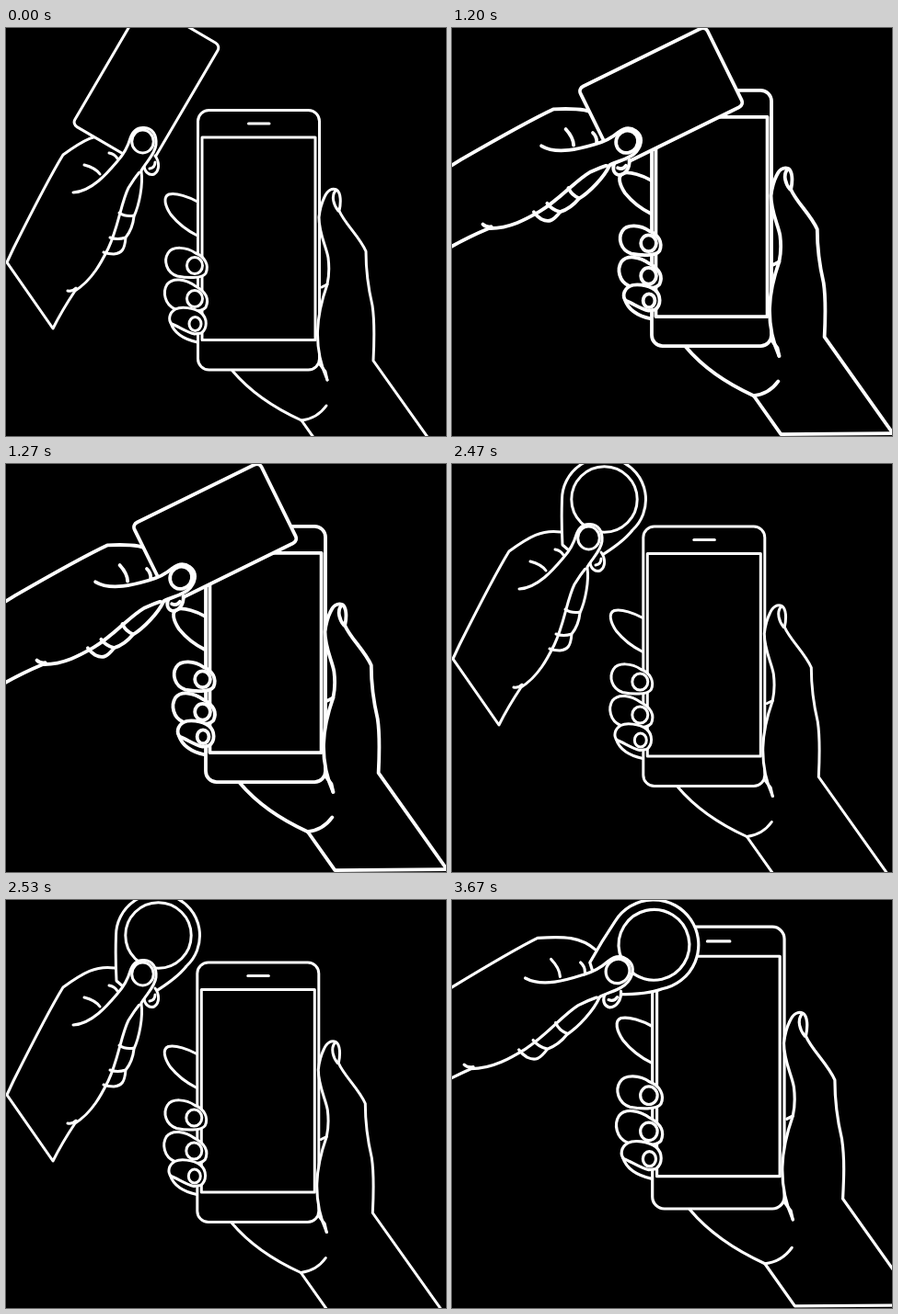
An HTML page for the animation above (4.79 s loop, 478 by 444 pixels).

```html
<!DOCTYPE html>
<html lang="en">
<head>
<meta charset="utf-8">
<title>Tap to phone</title>
<style>
  html, body { margin: 0; width: 100%; height: 100%; overflow: hidden; background: #000; }
  svg { display: block; width: 478px; height: 444px; }
  path, rect, ellipse, circle {
    fill: #000; stroke: #fff;
    stroke-linecap: round; stroke-linejoin: round;
    vector-effect: non-scaling-stroke;
  }
  .line { fill: none; }
</style>
</head>
<body>
<svg id="stage" viewBox="0 0 478 444">
  <g id="phone">
    <!-- palm, wrist and index finger behind the phone -->
    <path class="line" d="M246 373C262 392 288 412 321 427L351 469.5L474.5 468.5"/>
    <path class="line" d="M321 427Q338 425 348 411"/>
    <path d="M208 189C199 184 185 179 177 181C170 184 173 194 179 203C187 213 198 221 208 226"/>
    <path class="line" d="M179 321C183 333 194 339 208 342"/>
    <rect x="208.5" y="89.5" width="132" height="282.5" rx="12"/>
    <rect x="213" y="119" width="123" height="220.5"/>
    <path class="line" d="M263.5 104H286"/>
    <!-- fingers over the edge -->
    <path d="M186 270C174 266 171 253 176 245C181 237 196 238 206 245C216 249 221 258 217 267C213 273 196 272 186 270Z"/>
    <ellipse cx="205" cy="258.500" rx="8.500" ry="9"/>
    <path d="M184 306C172 301 170 287 175 279C181 271 195 273 206 281C217 287 221 295 217 304C212 310 196 309 184 306Z"/>
    <ellipse cx="205" cy="294.500" rx="8.500" ry="9"/>
    <path d="M212 332C219 327 219 316 212 310C204 304 190 303 184 306C177 310 176 318 180 322C188 325 196 331 205 333Z"/>
    <ellipse cx="205.500" cy="322" rx="6.500" ry="7.500"/>
    <!-- thumb -->
    <path d="M349 383C341 365 338 350 338.500 330C339 312 343 296 349 279C351 270 351 258 350 250C348 238 340 224 340 206C341 197 343 190 346 184C349 177 354 174 359 176C364 179 364 190 362 199C368 213 384 227 391 243C391 268 394 285 398 302C401 322 400 342 399 362L474.500 468.500"/>
    <path class="line" d="M358 177C353 183 356 193 361 199M343 282L349 279M341 366L347 374L349 383"/>
  </g>
  <g id="hand">
    <path d="M118 117C98 114 84 122 62 138C46 164 26 204 8 240L1 255L51 327C59 311 67 298 75 286C94 274 104 254 111 240C122 217 125 190 133 174Q139 164 147 154"/>
    <path class="line" d="M67 286Q72 287 76 283"/>
    <path class="line" d="M147 156C149 170 145 192 139 205C138 215 134 223 130 228C129 241 126 245 117 246Q111 246 106 244M123 201Q130 206 139 204M113 228Q121 231 130 228"/>
    <path class="line" d="M112 136Q118 137 121 142"/>
    <rect id="card" width="155" height="96" rx="6" transform="translate(71.9 104.6) rotate(-59.7)"/>
    <g id="fob">
      <path d="M127 137L120 131C119 112 119 96 119.500 81.500A45.500 45.500 0 1 1 196 115Q186 128 160 144"/>
      <circle cx="165.500" cy="81.500" r="35.700"/>
    </g>
    <path d="M162 139C167 146 167 155 161 159C155 161 150 156 150 149"/>
    <path class="line" d="M156 153Q162 152 162 146"/>
    <path d="M73 179C93 178 110 158 121 145C130 135 133 127 135 120C138 111 143 108 150 108.500C159 109 164 116 163 127C162 137 153 145 147 155"/>
    <ellipse cx="148.500" cy="123.500" rx="11.800" ry="12.500"/>
    <path class="line" d="M85 149Q97 152 102 159"/>
  </g>
</svg>
<script>
  const LOOP = 4790, HOLD = 1200;
  const el = id => document.getElementById(id);
  const stage = el('stage'), phone = el('phone'), hand = el('hand');
  const card = el('card'), fob = el('fob');

  // phone: corner x, y, scale; hand: thumbnail x, y, scale, turn
  const poses = [
    { phone: [208.5, 89.5, 1], hand: [149, 123.5, 1, 0], tool: card, line: 3 },
    { phone: [217, 67.8, 0.985], hand: [190.5, 124, 0.993, 33.5], tool: card, line: 3.8 },
    { phone: [207.8, 68, 1], hand: [149, 80.5, 1, 0], tool: fob, line: 3 },
    { phone: [217.7, 29.2, 1.086], hand: [180.5, 77.7, 1.075, 32], tool: fob, line: 3.2 }
  ];

  function place(node, [x, y, scale, turn = 0], px, py) {
    node.setAttribute('transform',
      `translate(${x} ${y}) rotate(${turn}) scale(${scale}) translate(${-px} ${-py})`);
  }

  function draw(time) {
    const pose = poses[Math.floor((time % LOOP) / HOLD)];
    place(phone, pose.phone, 208.5, 89.5);
    place(hand, pose.hand, 149, 123.5);
    stage.setAttribute('stroke-width', pose.line);
    for (const tool of [card, fob]) {
      tool.setAttribute('display', tool === pose.tool ? 'inline' : 'none');
    }
  }

  const start = performance.now();
  function tick() {
    draw(performance.now() - start);
    requestAnimationFrame(tick);
  }
  tick();
</script>
</body>
</html>
```
